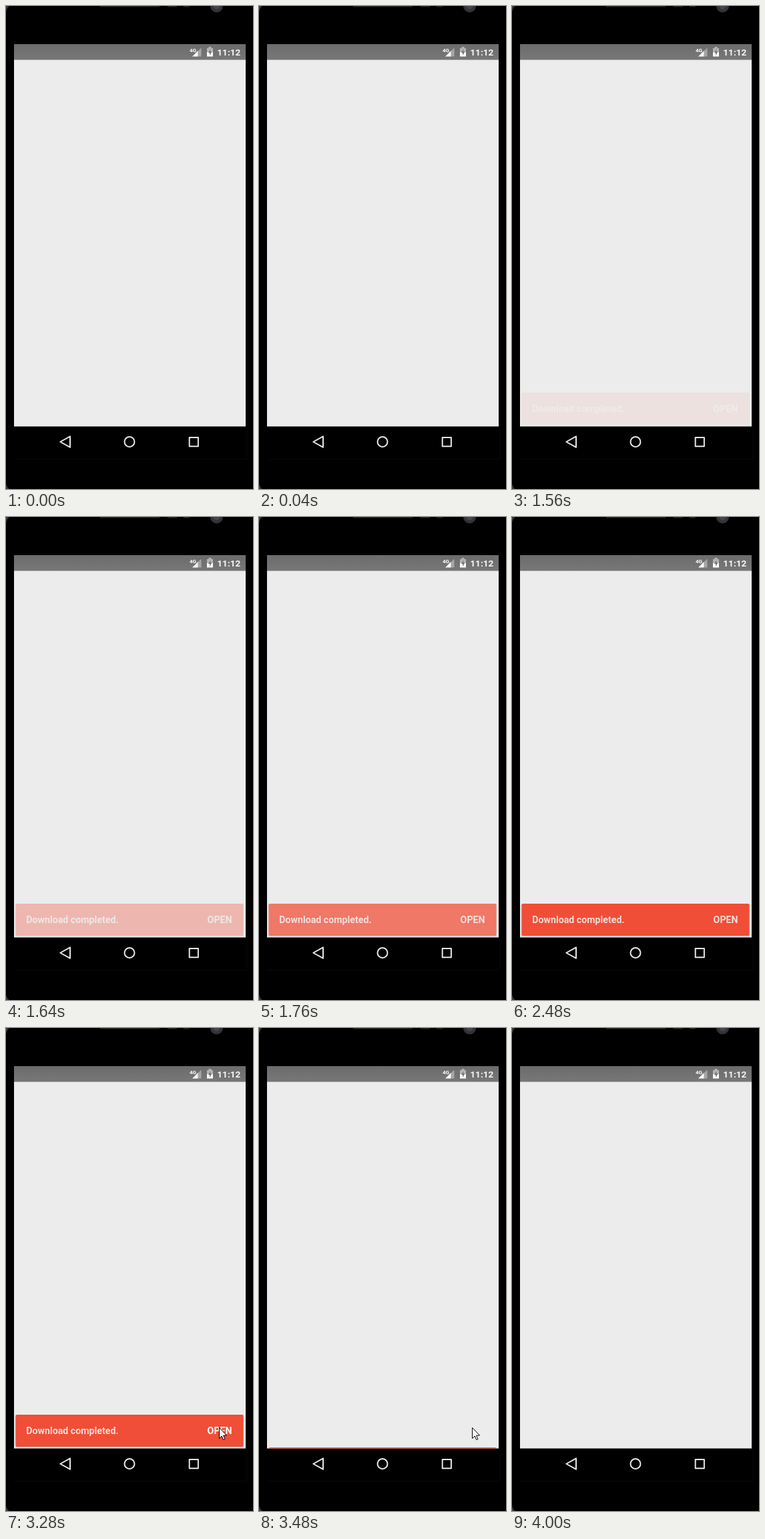
An HTML page that plays this animation: 370x722 px, repeating every 4.4 s.

```html
<!DOCTYPE html>
<html lang="en">
<head>
<meta charset="utf-8">
<style>
  html, body { margin: 0; width: 100%; height: 100%; overflow: hidden; background: #000; }
  svg { display: block; width: 370px; height: 722px; }
  text { font-family: Roboto, Arial, sans-serif; font-weight: 700; }
</style>
</head>
<body>
<svg viewBox="0 0 370 722">
  <defs>
    <linearGradient id="status" x2="0" y2="1">
      <stop offset="0" stop-color="#6c6c6c"/>
      <stop offset="1" stop-color="#777"/>
    </linearGradient>
    <clipPath id="screen"><rect x="12" y="57" width="347" height="571.5"/></clipPath>
  </defs>

  <!-- Phone body -->
  <rect width="370" height="722"/>
  <path d="M0 0H5Q1 3 0 9ZM0 714Q1 719 5 722H0Z" fill="#3a3a3c"/>
  <path d="M141 .5H230M242 .5H256M266 .5H275" stroke="#29292b" stroke-width="2"/>
  <circle cx="315.5" cy="0" r="9.5" fill="#343438"/>
  <circle cx="315.5" cy="0" r="5" fill="#45454b"/>
  <path d="M12 677.5H361V630" fill="none" stroke="#090909"/>

  <!-- Screen -->
  <rect x="12" y="57" width="347" height="571.5" fill="#ececec"/>
  <rect x="12" y="57" width="347" height="23.5" fill="url(#status)"/>

  <!-- Status icons -->
  <text x="275" y="68.5" font-size="8" fill="#fff" textLength="" >4G</text>
  <path d="M287.5 67.5L292.5 62.5V75.5H287.5Z" fill="#a6a6a6"/>
  <path d="M279 75.5L287.5 67V75.5Z" fill="#fff"/>
  <path d="M301 63H303.5V61H307.5V63H310V69H301Z" fill="#b4b4b4"/>
  <rect x="301" y="69" width="9" height="6.5" fill="#fff"/>
  <path d="M306.3 64.5L303 70H305.2V74L308.4 68.6H306.3Z" fill="#727272"/>
  <text x="316.3" y="74" font-size="13.6" fill="#f6f6f6">11:12</text>

  <!-- Snackbar -->
  <g clip-path="url(#screen)">
    <g id="bar">
      <rect x="13.5" y="578.5" width="343" height="49" rx="2" fill="#000" opacity=".13"/>
      <rect x="14.5" y="578" width="341" height="47.5" rx="2" fill="#f04e37"/>
      <path d="M15 625.2H355" stroke="#c8402d" stroke-width=".8"/>
      <g font-size="14.2" fill="#f8dcd6">
        <text x="30.3" y="607">Download completed.</text>
        <text id="open" x="301.6" y="607">OPEN</text>
      </g>
    </g>
  </g>

  <!-- Navigation -->
  <g fill="none" stroke="#e6e6e6" stroke-width="2" stroke-linejoin="round">
    <path d="M81.3 651.5L96 643.3V659.7Z"/>
    <circle cx="185" cy="651.5" r="7.5"/>
    <rect x="274.7" y="645" width="13.2" height="13.2"/>
  </g>

  <path id="cursor" d="M.5 .5V16.5L4.2 13L6.7 18.5L9 17.5L6.6 12H11.5Z" fill="#fff" stroke="#000"/>
</svg>
<script>
const LOOP = 4400, STEP = 40;
const [bar, open, cursor] = ['bar', 'open', 'cursor'].map(id => document.getElementById(id));

const progress = (t, from, to) => Math.min(1, Math.max(0, (t - from) / (to - from)));
const easeOut = p => 1 - (1 - p) ** 2;
const mix = (a, b, p) => a + (b - a) * p;

// Fast-out, slow-in: cubic-bezier(.4, 0, .2, 1)
function standard(x) {
  let lo = 0, hi = 1, u;
  for (let i = 0; i < 20; i++) {
    u = (lo + hi) / 2;
    const bx = 1.2 * u * (1 - u) ** 2 + .6 * u * u * (1 - u) + u ** 3;
    if (bx < x) lo = u; else hi = u;
  }
  return 3 * u * u * (1 - u) + u ** 3;
}

function cursorAt(t) {
  const enter = easeOut(progress(t, 2640, 3120));
  const leave = progress(t, 3720, 3960);
  return [
    Math.round(mix(mix(368, 319, enter), 74, leave)),
    Math.round(mix(mix(622, 597, enter), 593, leave))
  ];
}

function draw(t) {
  bar.setAttribute('opacity', progress(t, 1540, 1840));
  const drop = t < 3520 ? 51 * standard(progress(t, 3360, 3520)) : 60;
  bar.setAttribute('transform', `translate(0 ${drop})`);
  open.setAttribute('fill', t >= 3240 ? '#fff' : '#f8dcd6');
  cursor.setAttribute('transform', `translate(${cursorAt(t)})`);
  cursor.setAttribute('visibility', t >= 2680 && t < 4000 ? 'visible' : 'hidden');
}

const start = performance.now();
function tick() {
  const t = (performance.now() - start) % LOOP;
  draw(Math.floor(t / STEP) * STEP);
  requestAnimationFrame(tick);
}
tick();
</script>
</body>
</html>
```
